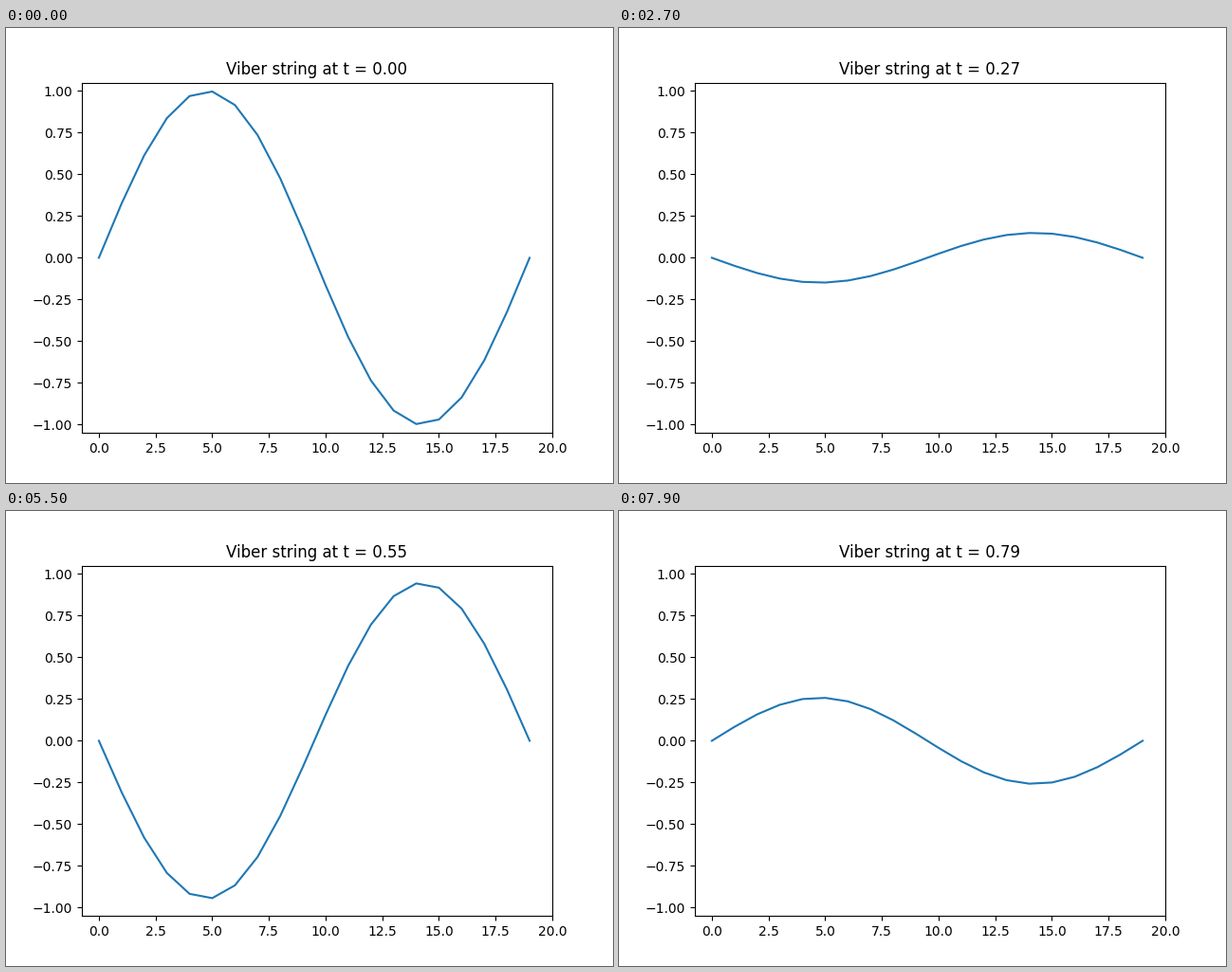
Recreate the animation shown at these times as a matplotlib script. Size 640x480 px, loop 8000 ms.

```python
import numpy as np
import matplotlib.pyplot as plt
from matplotlib.animation import FuncAnimation

POINTS = 20
FRAMES = 80
DT = 0.01

x = np.arange(POINTS)
dx = 1 / (POINTS - 1)
shape = np.sin(2 * np.pi * x * dx)

# Phase advance per step of the discrete wave equation (leapfrog scheme)
half_step = np.arcsin(DT / dx * np.sin(np.pi * dx))


def amplitude(n):
    """Leapfrog solution that starts with two equal states at rest."""
    return np.cos((2 * n + 1) * half_step) / np.cos(half_step)


fig, ax = plt.subplots(figsize=(6.4, 4.8), dpi=100)
line, = ax.plot(x, shape)
ax.set_xlim(-0.75, 20)
ax.set_ylim(-1.05, 1.05)
title = ax.set_title("")


def update(n):
    line.set_ydata(amplitude(n) * shape)
    title.set_text(f"Viber string at t = {n * DT:.2f}")
    return line, title


anim = FuncAnimation(fig, update, frames=FRAMES, interval=100,
                     repeat=True, repeat_delay=0, blit=False)
plt.show()
```
